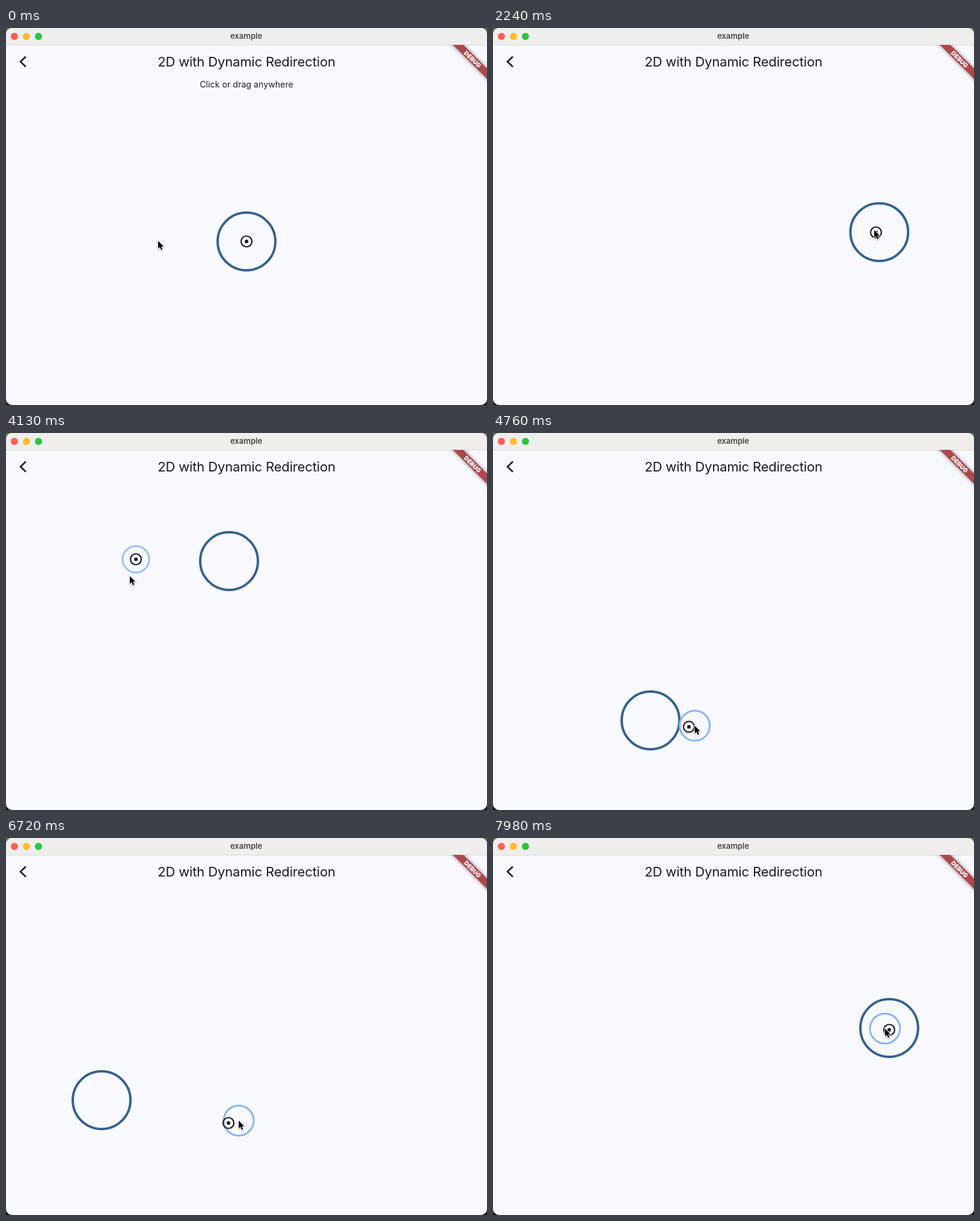
An HTML page with a canvas for the animation above (8000 ms loop, 800 by 627 pixels).

```html
<!DOCTYPE html>
<html lang="en">
<head>
<meta charset="utf-8">
<title>example</title>
<style>
html, body { margin: 0; width: 100%; height: 100%; overflow: hidden; background: #f8f9ff; }
canvas { display: block; }
</style>
</head>
<body>
<canvas id="stage" width="800" height="627"></canvas>
<script>
const ctx = document.getElementById('stage').getContext('2d');
const LOOP = 8000, STEP = 70, LAG = 14, SLOP = 160, DRAG = 4130;
const HOME = [400, 355];
const INK = '#191c20', BLUE = '#36618e', GLOW = '#86b5f9', PAGE = '#f8f9ff';
const FONT = 'Inter, "Open Sans", sans-serif';

// Keys are [time, x, y]
const pointer = track([
  [0, 253, 354], [210, 130, 390], [700, 130, 390], [1000, 140, 384], [1830, 637, 340],
  [2100, 637, 340], [2240, 634, 336], [2720, 640, 222], [3080, 640, 222], [3950, 216, 210],
  [4060, 216, 210], [4130, 206, 238], [4420, 180, 420], [4720, 310, 490], [5050, 560, 375],
  [5366, 638, 262], [5460, 631, 261], [6030, 135, 222], [6250, 128, 230], [6500, 118, 410],
  [6706, 370, 474], [6720, 387, 470], [7000, 643, 330], [7120, 640, 262], [7350, 265, 205],
  [7500, 250, 207], [7750, 410, 345], [7930, 664, 321], [7966, 659, 319], [7980, 652, 317],
  [8000, 645, 314]
]);

const dragged = track([
  [DRAG, 371, 213], [4200, 285, 212], [4300, 212, 222], [4460, 190, 340], [4600, 190, 430],
  [4740, 250, 478], [4990, 448, 465], [5250, 594, 330], [5460, 644, 256], [5600, 638, 262],
  [6090, 638, 260], [6230, 470, 235], [6370, 288, 222], [6510, 165, 246], [6600, 132, 325],
  [6720, 159, 436], [6860, 335, 474], [7000, 540, 425], [7140, 640, 315], [7240, 644, 265],
  [7360, 640, 255], [7500, 400, 215], [7640, 266, 215], [7780, 390, 318], [7980, 659, 316],
  [8000, 664, 314]
]);

// Press start and release
const presses = [[400, 560], [1940, 2090], [2790, 2950], [3990, 5380], [6080, 7130], [7390, 8100]];

// Smooth interpolation that never swings past its keys
function track(keys) {
  const slope = (i, a) => (keys[i + 1][a] - keys[i][a]) / (keys[i + 1][0] - keys[i][0]);
  const tangent = (i, a) => {
    if (i === 0 || i === keys.length - 1) return 0;
    const p = slope(i - 1, a), q = slope(i, a);
    return p * q > 0 ? 2 * p * q / (p + q) : 0;
  };
  return t => {
    let i = 0;
    while (i < keys.length - 2 && t >= keys[i + 1][0]) i++;
    const h = keys[i + 1][0] - keys[i][0];
    const u = Math.min(1, Math.max(0, (t - keys[i][0]) / h)), v = 1 - u;
    return [1, 2].map(a =>
      keys[i][a] * v * v * (1 + 2 * u) + keys[i + 1][a] * u * u * (3 - 2 * u) +
      h * u * v * (tangent(i, a) * v - tangent(i + 1, a) * u));
  };
}

// Step response of a slightly underdamped spring
function spring(ms) {
  const s = ms / 1000, decay = 9.67, freq = 8.5;
  return 1 - Math.exp(-decay * s) * (Math.cos(freq * s) + decay / freq * Math.sin(freq * s));
}

function ring(t) {
  if (t >= DRAG) return dragged(t);
  const past = presses.filter(p => p[0] <= t).map(p => p[0]);
  if (!past.length) return HOME;
  const start = past.pop(), to = pointer(start);
  const from = past.length ? pointer(past.pop()) : HOME;
  const k = spring(t - start);
  return from.map((v, i) => v + (to[i] - v) * k);
}

function circle([x, y], r, color, line) {
  ctx.beginPath();
  ctx.arc(x, y, r, 0, 7);
  if (line) {
    ctx.lineWidth = line;
    ctx.strokeStyle = color;
    ctx.stroke();
  } else {
    ctx.fillStyle = color;
    ctx.fill();
  }
}

function text(str, x, y, font, color, spacing = 0) {
  ctx.font = font + ' ' + FONT;
  ctx.letterSpacing = spacing + 'px';
  ctx.fillStyle = color;
  ctx.textAlign = 'center';
  ctx.fillText(str, x, y);
}

function banner() {
  ctx.save();
  ctx.beginPath();
  ctx.rect(0, 28, 800, 599);
  ctx.clip();
  ctx.translate(800, 28);
  ctx.rotate(Math.PI / 4);
  ctx.shadowColor = 'rgba(0,0,0,.5)';
  ctx.shadowBlur = 6;
  ctx.fillStyle = '#ad484b';
  ctx.fillRect(-60, 28, 120, 12);
  ctx.shadowBlur = 0;
  ctx.shadowColor = 'transparent';
  text('DEBUG', 0, 37.6, '900 10px', '#fff');
  ctx.restore();
}

function windowFrame() {
  ctx.fillStyle = '#101010';
  ctx.fillRect(0, 0, 800, 627);
  ctx.fillStyle = '#626a48';
  ctx.fillRect(0, 0, 800, 20);
  ctx.save();
  ctx.beginPath();
  ctx.roundRect(0, 0, 800, 627, 10);
  ctx.clip();
  ctx.fillStyle = PAGE;
  ctx.fillRect(0, 0, 800, 627);
  ctx.fillStyle = '#f0eeed';
  ctx.fillRect(0, 0, 800, 28);
  ctx.fillStyle = '#dcdbdb';
  ctx.fillRect(0, 28, 800, 1);
  ctx.restore();
  ['#ff5f57', '#febc2e', '#28c840'].forEach((c, i) => circle([14 + 20 * i, 14], 6, c));
  text('example', 399.5, 18, '600 13px', '#474443');
  text('2D with Dynamic Redirection', 400, 64, '400 22px', INK, -0.15);
  ctx.beginPath();
  ctx.moveTo(33, 47.5);
  ctx.lineTo(24, 56);
  ctx.lineTo(33, 64.5);
  ctx.lineWidth = 2.6;
  ctx.strokeStyle = INK;
  ctx.stroke();
  banner();
}

function arrow([x, y]) {
  ctx.save();
  ctx.translate(x, y);
  ctx.beginPath();
  [[0, 0], [0, 13], [2.9, 10.3], [5.1, 15.2], [7.3, 14.2], [5.2, 9.5], [9.2, 9.3]]
    .forEach(p => ctx.lineTo(...p));
  ctx.closePath();
  ctx.shadowColor = 'rgba(0,0,0,.3)';
  ctx.shadowBlur = 3;
  ctx.shadowOffsetY = 1;
  ctx.lineWidth = 1.8;
  ctx.strokeStyle = '#fff';
  ctx.stroke();
  ctx.shadowColor = 'transparent';
  ctx.fillStyle = '#000';
  ctx.fill();
  ctx.restore();
}

function draw(t) {
  windowFrame();

  ctx.globalAlpha = Math.max(0, Math.min(1, 1 - (t - 480) / 510));
  text('Click or drag anywhere', 400, 99, '400 14px', INK, 0.1);
  ctx.globalAlpha = 1;

  let goal = HOME;
  const press = presses.filter(p => p[0] <= t).pop();
  circle(ring(t), 48, BLUE, 4);
  if (press) {
    const [start, end] = press;
    const held = Math.min(t, end);
    const still = held - start <= SLOP;
    goal = pointer(still ? start : held - LAG);
    const p = Math.min(1, (t - start) / 190);
    const left = Math.max(0, Math.min(1, 1 - (t - end) / 70));
    ctx.globalAlpha = left * (0.25 + 0.75 * p);
    if (left && p) circle(still ? goal : pointer(held), 25 * (1 - (1 - p) ** 1.6), GLOW, 3);
    ctx.globalAlpha = 1;
  }
  circle(goal, 9, INK, 2.2);
  circle(goal, 3, INK);
  arrow(pointer(t));
}

function tick(now) {
  draw(Math.floor(now % LOOP / STEP) * STEP);
  requestAnimationFrame(tick);
}
draw(0);
requestAnimationFrame(tick);
</script>
</body>
</html>
```
